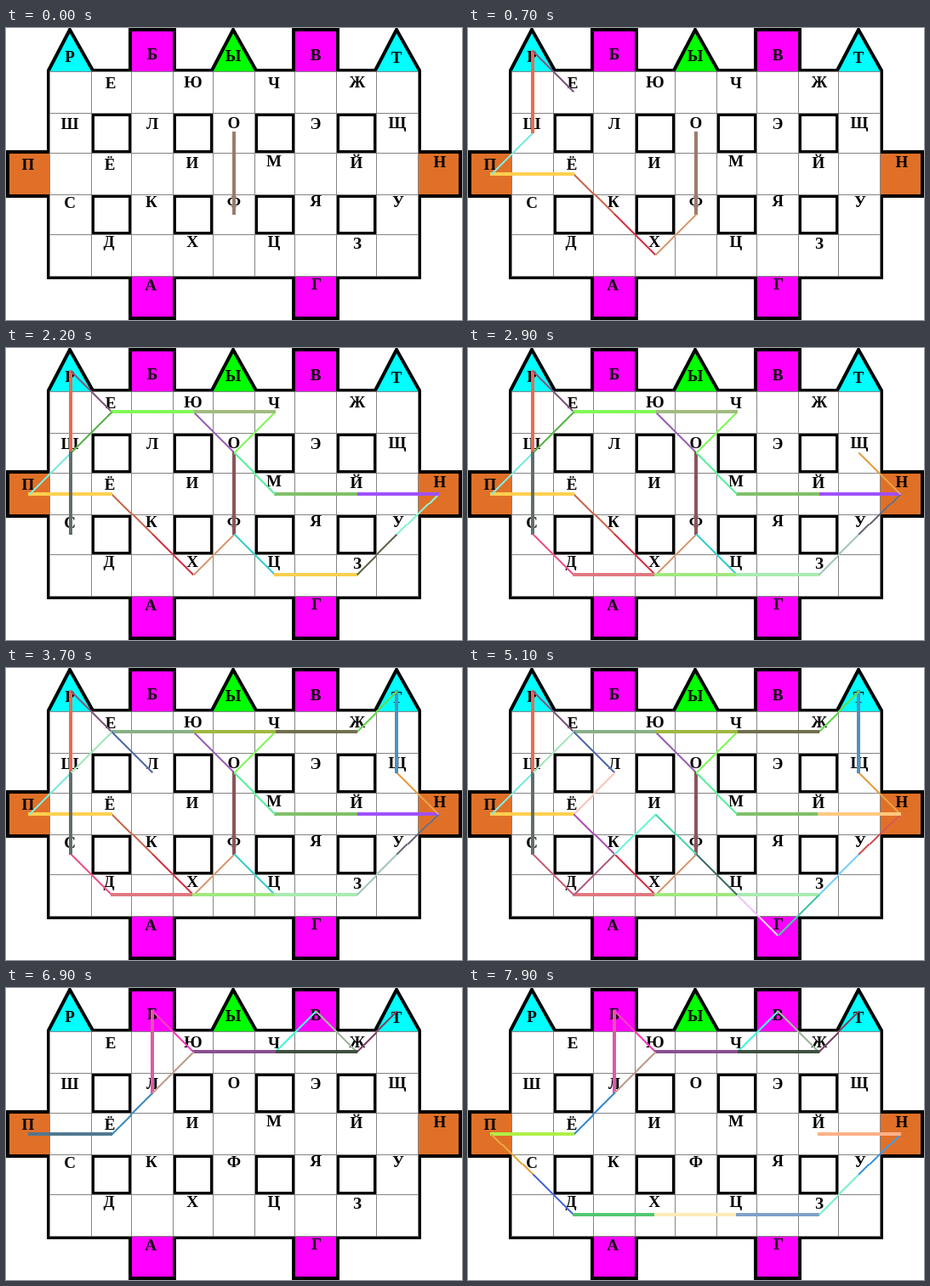
An HTML page that plays this animation: 536 by 344 pixels, repeating every 8000 ms.

```html
<!DOCTYPE html>
<html lang="ru">
<head>
<meta charset="utf-8">
<style>
html, body { margin: 0; width: 100%; height: 100%; overflow: hidden; background: #fff; }
svg { display: block; }
text { font: bold 19px "Liberation Serif", "Times New Roman", serif; text-anchor: middle; }
#trail { shape-rendering: crispEdges; }
</style>
</head>
<body>
<svg width="536" height="344" viewBox="0 0 536 344">
  <path fill="#0ff" d="M50 51L75 2L102 51ZM434 51L459 2L486 51Z"/>
  <path fill="#0f0" d="M242 51L267 2L294 51Z"/>
  <path fill="#f0f" d="M146 2h52v49h-52zM338 2h52v49h-52zM146 293h52v49h-52zM338 293h52v49h-52z"/>
  <path fill="#e07028" d="M2 146h49v52h-49zM485 146h49v52h-49z"/>
  <path fill="none" stroke="#000" stroke-width="4" stroke-miterlimit="9"
    d="M50 50L75 2L102 50H146V2H198V50H242L267 2L294 50H338V2H390V50H434L459 2L486 50V146H534V198H486V294H390V342H338V294H198V342H146V294H50V198H2V146H50Z"/>
  <g id="rooms" fill="#fff" stroke="#000" stroke-width="4"></g>
  <path id="grid" fill="none" stroke="#848484"/>
  <g id="letters"></g>
  <g id="trail"></g>
</svg>
<script>
const $ = id => document.getElementById(id);

function add(parent, tag, attrs, text = '') {
  const el = document.createElementNS('http://www.w3.org/2000/svg', tag);
  for (const key in attrs) el.setAttribute(key, attrs[key]);
  el.textContent = text;
  $(parent).append(el);
  return el;
}

// Grid lines alternate between gaps of 49 and 47 pixels.
const gridLine = i => 51 + 48 * i + i % 2;
let grid = '';
for (let i = 0; i < 10; i++) grid += `M${gridLine(i)}.5 51V293`;
for (let i = 0; i < 6; i++) grid += `M51 ${gridLine(i)}.5H485`;
$('grid').setAttribute('d', grid);

for (const y of [102, 198])
  for (let i = 0; i < 4; i++)
    add('rooms', 'rect', { x: 102 + 96 * i, y, width: 44, height: 44 });

const cols = [27, 76, 124, 172, 220, 268, 316, 364, 412, 459, 508];
const lanes = [27, 75, 123, 172, 219, 267, 315];

// Each item: letter, then its small horizontal and vertical offsets; "-" is a gap.
const rows = [
  'Р28 Б35 Ы27 В36 Т39',
  '- Е25 Ю34 Ч25 Ж44',
  'Ш25 Л35 О34 Э35 Щ44',
  'П24 Ё14 И22 М20 Й32 Н51',
  'С22 К21 Ф31 Я30 У51',
  '- Д00 Х20 Ц20 З42',
  '- А13 - Г42'
];
const nodes = {};
rows.forEach((row, r) => row.split(' ').forEach((item, i) => {
  if (item === '-') return;
  const [letter, dx, dy] = item;
  const x = cols[2 * i + (r % 2 ? 0 : 1)], y = lanes[r];
  nodes[letter] = [x, y];
  add('letters', 'text', { x: x + +dx - 3, y: y + +dy + (r ? -9 : 5) }, letter);
}));

const walk = 'ОФХКЁПШРЕЮОФЦЗУНЙМОЧЮЕШСДХЦЗУНЩТЖЧЮЕШЕЛЁКДСДКИФЦГЗУНЙМОЮЕШП' +
  'ЁЛБЮЧВЖТЖЧЮЛЁПСДХЦЗУНЙ';
const colors = `
  9b7b6b d8a078 d04050 c87058 ffd050 80e8e0 f06850 806080 f098d8 a068b8
  8c5458 40d0d0 f8d050 646c54 8cf4d0 a050ff 80c068 60f0a0 88f860 a0bc80
  80f858 60b850 646c6c f05890 e07880 a0e880 a8ecb0 a8c8c0 707080 e8a048
  5090c0 68d850 707050 a0b840 88b088 90c8b0 a8e8c0 5870b0 f8c8c0 b058b8
  b06888 c86880 c86880 b06888 70f8d8 50d8b0 487870 f0c8f8 48c8a8 80d0f8
  d85858 ffc880 90b880 70c8a0 a080b0 90b098 98c8a8 80c8c8 507890 4890c0
  e058a8 ff40c0 906898 48f8e0 a0b8a0 885870 804868 405040 885090 c0a090
  4090d0 b0f048 e8a840 5070d8 50c870 ffecb8 80a0c8 80f0d0 4898e0 ffb088`.trim().split(/\s+/);

const lines = colors.map((color, k) => {
  const [x1, y1] = nodes[walk[k]], [x2, y2] = nodes[walk[k + 1]];
  const diagonal = x1 !== x2 && y1 !== y2;
  const shift = diagonal ? 0.5 : 0, reach = diagonal ? 0 : 1;
  const ex = Math.sign(x2 - x1) * reach, ey = Math.sign(y2 - y1) * reach;
  return add('trail', 'line', {
    x1: x1 + shift - ex, y1: y1 + shift - ey,
    x2: x2 + shift + ex, y2: y2 + shift + ey,
    stroke: '#' + color, 'stroke-width': diagonal ? 2.1 : 4
  });
});

const STEP = 100, RESTART = 58;

function draw() {
  const step = Math.floor(performance.now() / STEP) % lines.length;
  const first = step < RESTART ? 0 : RESTART;
  lines.forEach((line, k) => {
    line.style.display = k >= first && k <= step ? '' : 'none';
  });
  requestAnimationFrame(draw);
}
draw();
</script>
</body>
</html>
```
